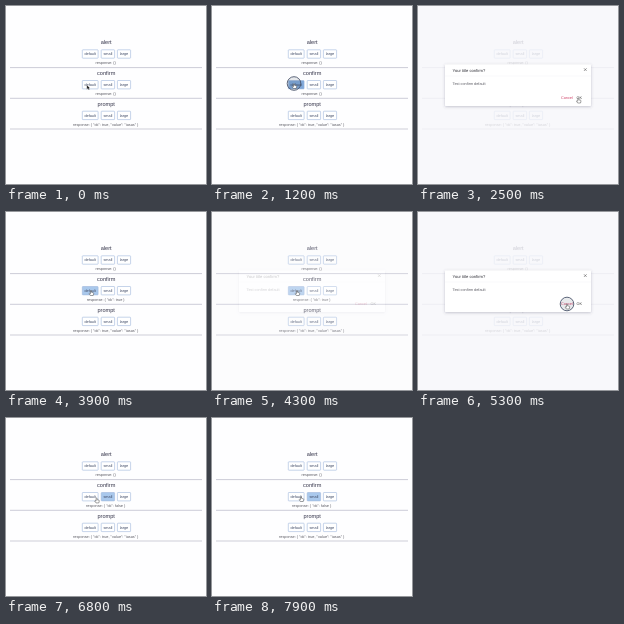
An HTML page that plays this animation: 200x178 px, repeating every 8 s.

```html
<!DOCTYPE html>
<html lang="en">
<head>
<meta charset="utf-8">
<title>Dialogs</title>
<style>
html, body { margin: 0; width: 100%; height: 100%; overflow: hidden; background: #fefeff; }
svg { display: block; width: 200px; height: 178px; }
text { font: 3.8px "Liberation Sans", Arial, sans-serif; fill: #5c5c64; text-rendering: geometricPrecision; }
.mid { text-anchor: middle; }
.title { font-size: 5.6px; fill: #35354a; }
.btn rect { fill: #fff; stroke: #9fb8dc; stroke-width: .6; }
.btn text { fill: #3f4a66; }
.rule { stroke: #b8b8c8; stroke-width: .7; }
</style>
</head>
<body>
<svg viewBox="0 0 200 178">
  <defs>
    <filter id="soft" x="-10%" y="-20%" width="120%" height="150%">
      <feDropShadow dx="0" dy=".8" stdDeviation="1.8" flood-color="#446" flood-opacity=".32"/>
    </filter>
  </defs>
  <g id="page"></g>
  <g id="dialog">
    <rect width="200" height="178" fill="#f7f7fb" opacity=".8"/>
    <rect x="27" y="58.5" width="146" height="41.5" rx=".8" fill="#fff" filter="url(#soft)"/>
    <path d="M27 70H173" stroke="#f1f1f4" stroke-width=".5"/>
    <text x="34.6" y="66" style="font-size:4.1px;fill:#2c2c34">Your title confirm?</text>
    <path d="M166 62.3l2.6 2.6m0-2.6l-2.6 2.6" stroke="#555" stroke-width=".6"/>
    <text x="34.6" y="79">Test confirm default</text>
    <text x="143" y="93.4" style="fill:#d0456a">Cancel</text>
    <text x="158.5" y="93.4" style="fill:#444">OK</text>
  </g>
  <circle id="ring" r="6.8" fill="#456" fill-opacity=".12" stroke="#4c566c" stroke-width=".9"/>
  <path id="arrow" d="M0 0V4.4L1.1 3.5 1.9 5.1 2.7 4.7 2 3.2H3.3Z" fill="#111" stroke="#fff" stroke-width=".3"/>
  <path id="hand" d="M-.5 .3Q0-.3 .5 .3V1.8L2.4 2.3Q2.8 2.5 2.7 3L2.2 5H-.6L-1.9 3.1Q-1.7 2.4-.5 3.1Z" fill="#fff" stroke="#333" stroke-width=".45"/>
</svg>
<script>
const $ = id => document.getElementById(id);
const LOOP = 8000, STEP = 100, ROW = 30.7;

const button = (label, x, w, y) =>
  `<g class="btn"><rect x="${x}" y="${y}" width="${w}" height="8.4" rx=".6"/>` +
  `<text class="mid" x="${x + w / 2}" y="${y + 5.5}">${label}</text></g>`;

$('page').innerHTML = ['alert', 'confirm', 'prompt'].map((name, i) => {
  const y = ROW * i;
  return `<text class="mid title" x="100.2" y="${38.4 + y}">${name}</text>` +
    button('default', 76.3, 15.8, 43.8 + y) +
    button('small', 95.2, 13.4, 43.8 + y) +
    button('large', 111.4, 13.2, 43.8 + y) +
    `<text class="mid reply" x="99.7" y="${58.2 + y}">response: {}</text>` +
    `<path class="rule" d="M4 ${61.6 + y}H196"/>`;
}).join('');

const replies = document.querySelectorAll('.reply');
const buttons = [...document.querySelectorAll('.btn rect')];
replies[2].textContent = 'response: { "ok": true, "value": "iasas" }';

const home = { x: 80.8, y: 79 };
const moves = [
  { from: 300, to: 500, x: 65, y: 87.5 },
  { from: 700, to: 900, x: 82, y: 77.5 },
  { from: 1300, to: 2500, x: 160.3, y: 92 },
  { from: 3200, to: 3900, x: 85, y: 78.5 },
  { from: 4300, to: 5200, x: 149, y: 92 },
  { from: 5700, to: 6100, x: 116, y: 93.5 },
  { from: 6100, to: 6500, x: 98, y: 84 },
  { from: 6600, to: 6900, x: 88, y: 78.5 },
  { from: 6900, to: 7200, x: 99, y: 80 },
  { from: 7800, to: 7900, x: 89, y: 78.5 }
];

// Each dialog is opened by one click and closed by the next
const dialogs = [{ open: 1100, close: 2700 }, { open: 4100, close: 5200 }];
const answers = ['{}', '{ "ok": true }', '{ "ok": false }'];

const clamp = v => Math.min(1, Math.max(0, v));
const smooth = p => p * p * (3 - 2 * p);

const pointer = t => moves.reduce((at, m) => {
  const p = smooth(clamp((t - m.from) / (m.to - m.from)));
  return { x: at.x + (m.x - at.x) * p, y: at.y + (m.y - at.y) * p };
}, home);

const fade = t => Math.max(...dialogs.map(d =>
  clamp((t - d.open - 100) / 400) * clamp((d.close + 200 - t) / 100)));

const clicking = t => dialogs.some(d =>
  [d.open, d.close].some(c => t >= c && t < c + 200));

// The page notices hovering only once the pointer has moved
function hovered(t) {
  if (t < moves[0].to || fade(t) > .5) return;
  const { x, y } = pointer(t);
  return buttons.find(b => {
    const box = b.getBBox();
    return x > box.x && x < box.x + box.width && y > box.y && y < box.y + box.height;
  });
}

function overAction(t) {
  const { x, y } = pointer(t);
  return fade(t) > .5 && x > 143 && x < 165 && y > 89 && y < 95;
}

const show = (id, on) => { $(id).style.display = on ? '' : 'none'; };

function draw(now) {
  const t = Math.floor(now % LOOP / STEP) * STEP;
  const { x, y } = pointer(t);
  const hand = Boolean(hovered(t) || overAction(t));
  const lit = hovered(t - STEP);

  for (const id of ['ring', 'arrow', 'hand']) $(id).setAttribute('transform', `translate(${x} ${y})`);
  show('ring', clicking(t));
  show('hand', hand);
  show('arrow', !hand);
  $('dialog').style.opacity = fade(t);
  for (const b of buttons) b.style.fill = b !== lit ? '' : clicking(t) ? '#7fa8da' : '#a9c8ec';
  replies[1].textContent = 'response: ' + answers[dialogs.filter(d => t >= d.close + 200).length];
}

function frame() {
  draw(performance.now());
  requestAnimationFrame(frame);
}
frame();
</script>
</body>
</html>
```
